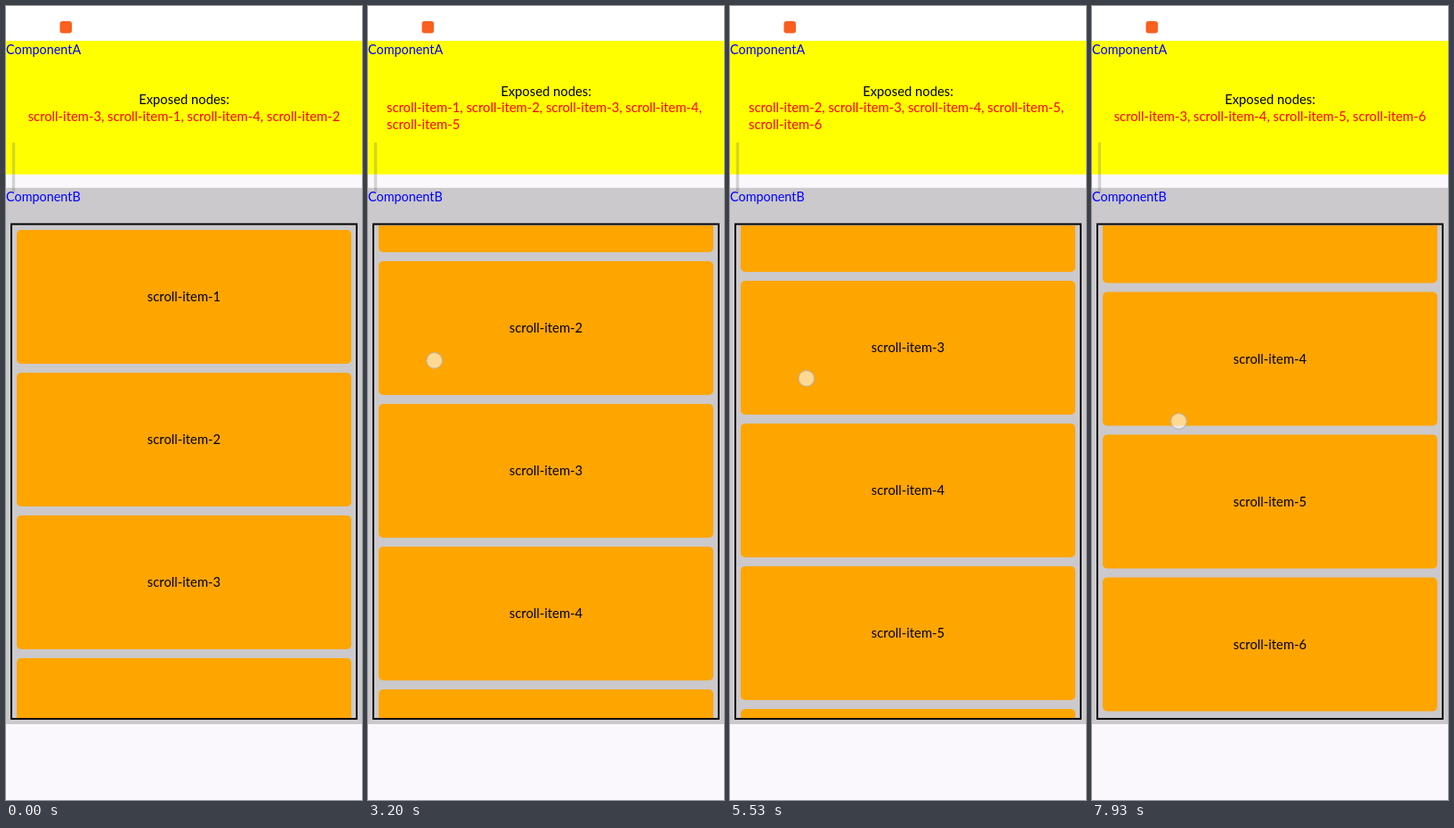
An HTML page that plays this animation: 400 px wide and 890 px high, repeating every 8000 ms.

```html
<!DOCTYPE html>
<html lang="en">
<head>
<meta charset="utf-8">
<title>Exposed nodes</title>
<style>
  html, body { margin: 0; width: 100%; height: 100%; overflow: hidden; background: #faf8fc; }
  svg { display: block; width: 400px; height: 890px; }
  text { font: 14.8px Lato, "Open Sans", sans-serif; white-space: pre; }
  .mid { text-anchor: middle; }
  .label { font-size: 14.4px; fill: #00f; }
  .red { fill: #f00; }
</style>
</head>
<body>
<svg viewBox="0 0 400 890">
  <defs><clipPath id="view"><rect x="7" y="246" width="386" height="552"/></clipPath></defs>
  <rect width="400" height="39" fill="#fff"/>
  <rect x="60.5" y="17" width="13.5" height="13.5" rx="3" fill="#f9601f"/>

  <rect y="39" width="400" height="149.7" fill="#ff0"/>
  <text class="label" x="0" y="53.5">ComponentA</text>
  <text class="mid" id="heading" x="200">Exposed nodes:</text>
  <text class="red" id="line1"></text>
  <text class="red" id="line2" x="21"></text>

  <rect y="203.8" width="400" height="601.2" fill="#cbc9cc"/>
  <text class="label" x="0" y="218.5">ComponentB</text>
  <g clip-path="url(#view)"><g id="list"></g></g>
  <rect x="6" y="244.5" width="388" height="554.5" fill="none" stroke="#000" stroke-width="2"/>
  <rect x="6.8" y="153" width="3.4" height="56" rx="1" fill="#777" fill-opacity=".3"/>
  <circle id="touch" r="8.8" fill="#fff" fill-opacity=".58" stroke="#b5b3b5" stroke-width="1"/>
</svg>
<script>
const LOOP = 8000, PITCH = 160, FIRST_TOP = 251, ITEM_HEIGHT = 150;
const VIEW_TOP = 246, VIEW_BOTTOM = 798, COUNT = 7;
const $ = id => document.getElementById(id);

// [time, scroll offset]
const scrollKeys = [
  [930, 0], [1600, 44], [2470, 78.5], [4000, 176], [4250, 191],
  [4650, 191], [5530, 263], [6470, 321], [7000, 364],
  [7350, 364], [7930, 410.5], [8000, 412.5]
];

// During a drag the finger stays fixed relative to the scrolled content.
const drags = [
  { from: 930, to: 4250, grip: 522.5, x: 85, y: 478, slope: 0.129 },
  { from: 4600, to: 7000, grip: 680.5, x: 86, y: 418, slope: 0.203 },
  { from: 7300, to: LOOP, grip: 876, x: 97.5, y: 465.5, slope: 0.2 }
];

const itemTop = n => FIRST_TOP + PITCH * (n - 1);
const numbers = Array.from({ length: COUNT }, (_, i) => i + 1);
$('list').innerHTML = numbers.map(n => `
  <rect x="12" y="${itemTop(n)}" width="376" height="${ITEM_HEIGHT}" rx="5" fill="#ffa500"/>
  <text class="mid" x="200" y="${itemTop(n) + 80.4}">scroll-item-${n}</text>`).join('');

function scrollAt(time) {
  const next = scrollKeys.findIndex(([t]) => t > time);
  if (next <= 0) return 0;
  const [t0, s0] = scrollKeys[next - 1], [t1, s1] = scrollKeys[next];
  return s0 + (s1 - s0) * (time - t0) / (t1 - t0);
}

function exposedAt(scroll) {
  const visible = numbers.filter(n => {
    const top = itemTop(n) - scroll;
    return top < VIEW_BOTTOM && top + ITEM_HEIGHT > VIEW_TOP;
  });
  return visible.join() === '1,2,3,4' ? [3, 1, 4, 2] : visible;
}

let shown = '';
function showExposed(nodes) {
  if (shown === nodes.join()) return;
  shown = nodes.join();
  const names = nodes.map(n => 'scroll-item-' + n);
  const wraps = names.length > 4;
  const top = wraps ? 100.7 : 109.8;
  const line1 = $('line1');
  $('heading').setAttribute('y', top);
  line1.setAttribute('y', top + 18.7);
  line1.setAttribute('x', wraps ? 21 : 200);
  line1.classList.toggle('mid', !wraps);
  line1.textContent = names.slice(0, 4).join(', ') + (wraps ? ',' : '');
  $('line2').setAttribute('y', top + 37.4);
  $('line2').textContent = names.slice(4).join(', ');
}

function draw() {
  const time = performance.now() % LOOP;
  const scroll = scrollAt(time);
  $('list').setAttribute('transform', `translate(0 ${-scroll})`);
  showExposed(exposedAt(scroll));

  const drag = drags.find(d => time >= d.from && time < d.to);
  const touch = $('touch');
  touch.style.display = drag ? '' : 'none';
  if (drag) {
    const y = drag.grip - scroll;
    touch.setAttribute('cx', drag.x + (y - drag.y) * drag.slope);
    touch.setAttribute('cy', y);
  }
  requestAnimationFrame(draw);
}
draw();
</script>
</body>
</html>
```
